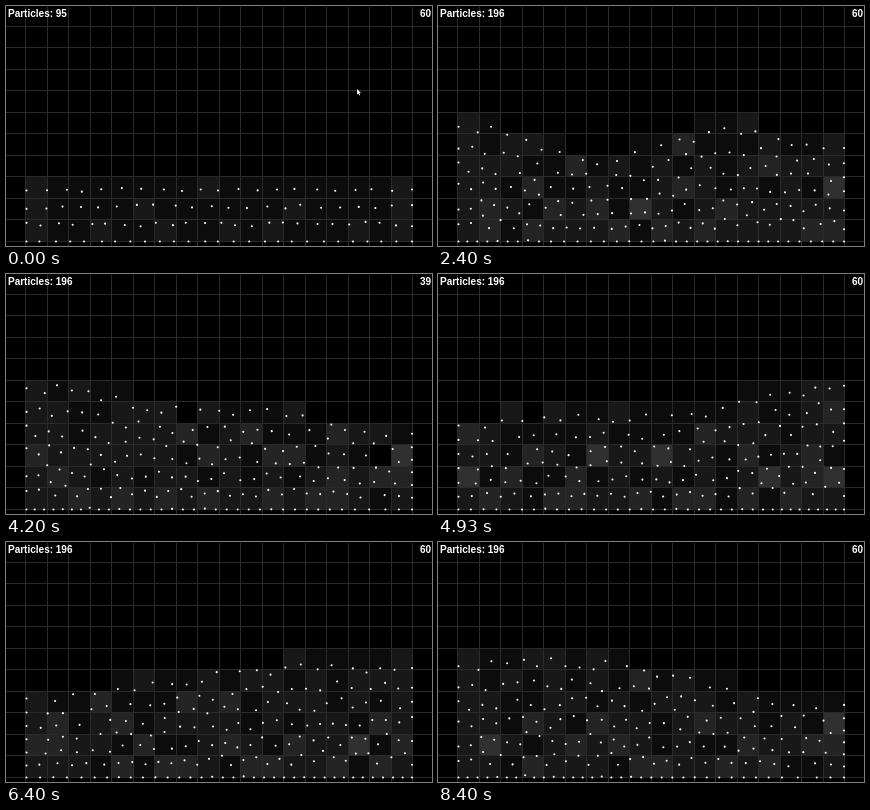
Write an HTML page with a canvas that moves like this. It is 426 by 240 pixels and loops after 8470 ms.

```html
<!DOCTYPE html>
<html lang="en">
<head>
<meta charset="utf-8">
<title>Particle fluid</title>
<style>
html, body { margin: 0; width: 426px; height: 240px; overflow: hidden; background: #000; }
canvas { display: block; }
div { position: absolute; top: 2px; color: #fff; font: bold 10px/11px "Liberation Sans", Arial, sans-serif; white-space: pre; }
#count { left: 2px; }
#fps { right: 1px; }
</style>
</head>
<body>
<canvas id="stage" width="426" height="240"></canvas>
<div id="count"></div>
<div id="fps"></div>
<script>
const ctx = document.getElementById('stage').getContext('2d');
const countLabel = document.getElementById('count');
const fpsLabel = document.getElementById('fps');

const LOOP = 8470, STEP = 200 / 3, CELL = 21.5;
const LEFT = 20, RIGHT = 405.5, TOP = 18, FLOOR = 235;
const GRAVITY = 320, POOL = 95;

let seed = 11;
const random = () => (seed = seed * 16807 % 2147483647) / 2147483647;
const spread = a => (random() - 0.5) * 2 * a;
const clamp = (v, a, b) => Math.min(b, Math.max(a, v));
const mix = (a, b, k) => a + (b - a) * k;
const smooth = (a, b, v) => { const k = clamp((v - a) / (b - a), 0, 1); return k * k * (3 - 2 * k); };

// Staggered rows from floor to surface; m runs across, v runs up.
function lattice(rows, jitter) {
  return rows.flatMap((n, r) => Array.from({ length: n }, (_, i) => {
    const wall = i === 0 || i === n - 1;
    return {
      m: wall ? i / (n - 1) : (i + spread(jitter)) / (n - 1),
      v: (r + (r ? spread(jitter) : 0)) / (rows.length - 1)
    };
  }));
}

const byM = (a, b) => a.m - b.m;
const pool = lattice([27, 25, 22, 21], 0.13).sort(byM);
const slots = lattice([36, 32, 29, 27, 25, 24, 23], 0.36).sort((a, b) => a.m + a.v - b.m - b.v);
const particles = [
  ...slots.slice(0, POOL).sort(byM).map((slot, i) => ({ slot, rest: pool[i], born: -1 })),
  ...slots.slice(POOL).map(slot => ({
    slot,
    born: 70 + random() * 1020,
    vx: (slot.m - 0.74) * 480 + spread(110),
    vy: -70 + spread(150)
  }))
];

// Depth at u (0 to 1 across the tank): a filling level plus three standing waves.
function depthAt(u, t) {
  const wave = (mode, size, peak, period) =>
    size * Math.cos(mode * Math.PI * u) * Math.cos(2 * Math.PI * (t - peak) / period);
  const ripple = 13 * Math.exp((2400 - t) / 2500);
  const slosh = wave(1, -33, 5670, 4300) + wave(2, 7, 2400, 2400) + wave(3, ripple, 2400, 1800);
  return mix(52, 97, smooth(900, 2300, t)) + slosh * smooth(1000, 2300, t);
}

// Places slots so that each column holds water in proportion to its depth.
function flow(t) {
  const N = 64, sum = [0];
  for (let i = 0; i < N; i++) sum.push(sum[i] + depthAt((i + 0.5) / N, t));
  return ({ m, v }) => {
    const goal = clamp(m, 0, 1) * sum[N];
    let i = 0;
    while (i < N - 1 && sum[i + 1] < goal) i++;
    const u = (i + (goal - sum[i]) / (sum[i + 1] - sum[i])) / N;
    return { x: mix(LEFT, RIGHT, u), y: FLOOR - v * depthAt(u, t) };
  };
}

const cursorAt = t => ({ x: 351 + smooth(0, 1100, t), y: 83 - 9 * smooth(0, 1100, t) });

function place(p, t, settle) {
  const home = settle(p.slot);
  let from, k;
  if (p.rest) {
    from = { x: mix(LEFT, RIGHT, p.rest.m), y: FLOOR - p.rest.v * 52 };
    k = smooth(1000, 2200, t);
  } else {
    const age = (t - p.born) / 1000, start = cursorAt(p.born);
    let x = start.x + p.vx * age;
    if (x > RIGHT) x = 2 * RIGHT - x;
    from = {
      x: clamp(x, LEFT, RIGHT),
      y: clamp(start.y + p.vy * age + GRAVITY * age * age / 2, TOP, FLOOR)
    };
    k = smooth(0.6, 1.3, age);
  }
  return { x: mix(from.x, home.x, k), y: mix(from.y, home.y, k) };
}

// Pushes crowded neighbours apart.
function relax(dots, gap) {
  for (let pass = 0; pass < 8; pass++) {
    for (let i = 0; i < dots.length; i++) for (let j = 0; j < i; j++) {
      const a = dots[i], b = dots[j], dx = a.x - b.x, dy = a.y - b.y;
      const d = Math.hypot(dx, dy);
      if (d >= gap || d < 0.01) continue;
      const push = (gap - d) / d * 0.2;
      a.x += dx * push; a.y += dy * push;
      b.x -= dx * push; b.y -= dy * push;
    }
    for (const d of dots) {
      d.x = clamp(d.x, LEFT, RIGHT);
      d.y = clamp(d.y, TOP, FLOOR);
    }
  }
}

// Shades each cell by how many particles it holds.
function drawCells(dots) {
  const cells = new Map();
  for (const d of dots) {
    if (d.y >= FLOOR) continue;
    const key = Math.floor((d.x - 19.5) / CELL) + ',' + Math.floor((d.y - 20) / CELL);
    cells.set(key, (cells.get(key) || 0) + 1);
  }
  for (const [key, n] of cells) {
    const [c, r] = key.split(',').map(Number), g = Math.min(60, n * 12);
    ctx.fillStyle = `rgb(${g},${g},${g})`;
    ctx.fillRect(Math.floor(19.5 + c * CELL), Math.floor(20 + r * CELL), 22, 22);
  }
}

function drawGrid() {
  ctx.fillStyle = '#2a2a2a';
  for (let x = 19.5; x < 426; x += CELL) ctx.fillRect(Math.floor(x), 1, 1, 239);
  for (let y = 20; y < 240; y += CELL) ctx.fillRect(0, Math.floor(y), 426, 1);
}

function drawCursor({ x, y }) {
  ctx.beginPath();
  [[0, 0], [0, 5.5], [1.3, 4.4], [2.3, 6.4], [3.2, 6], [2.3, 4], [4, 4]]
    .forEach(([dx, dy]) => ctx.lineTo(x + dx, y + dy));
  ctx.fill();
}

// Mostly steady, with a regular stall that grows milder.
function frameRate(n) {
  const phase = n % 46;
  if (phase > 16 && phase < 21) return 33 + 6 * Math.floor(n / 46);
  return n % 20 === 5 ? 59 : 60;
}

function draw(n) {
  const t = n * STEP;
  const settle = flow(t);
  const dots = particles.filter(p => p.born < t).map(p => place(p, t, settle));
  relax(dots, mix(10, 14.5, smooth(1200, 2400, t)));

  ctx.fillStyle = '#000';
  ctx.fillRect(0, 0, 426, 240);
  drawCells(dots);
  drawGrid();
  ctx.fillStyle = '#fff';
  for (const d of dots) {
    ctx.beginPath();
    ctx.arc(d.x + 0.5, d.y + 0.5, 1.05, 0, 7);
    ctx.fill();
  }
  if (t < 1500) drawCursor(cursorAt(t));

  countLabel.textContent = 'Particles: ' + dots.length;
  fpsLabel.textContent = frameRate(n);
}

let shown = -1;
function tick() {
  const n = Math.min(126, Math.floor((performance.now() % LOOP + 5) / STEP));
  if (n !== shown) draw(shown = n);
  requestAnimationFrame(tick);
}
tick();
</script>
</body>
</html>
```
